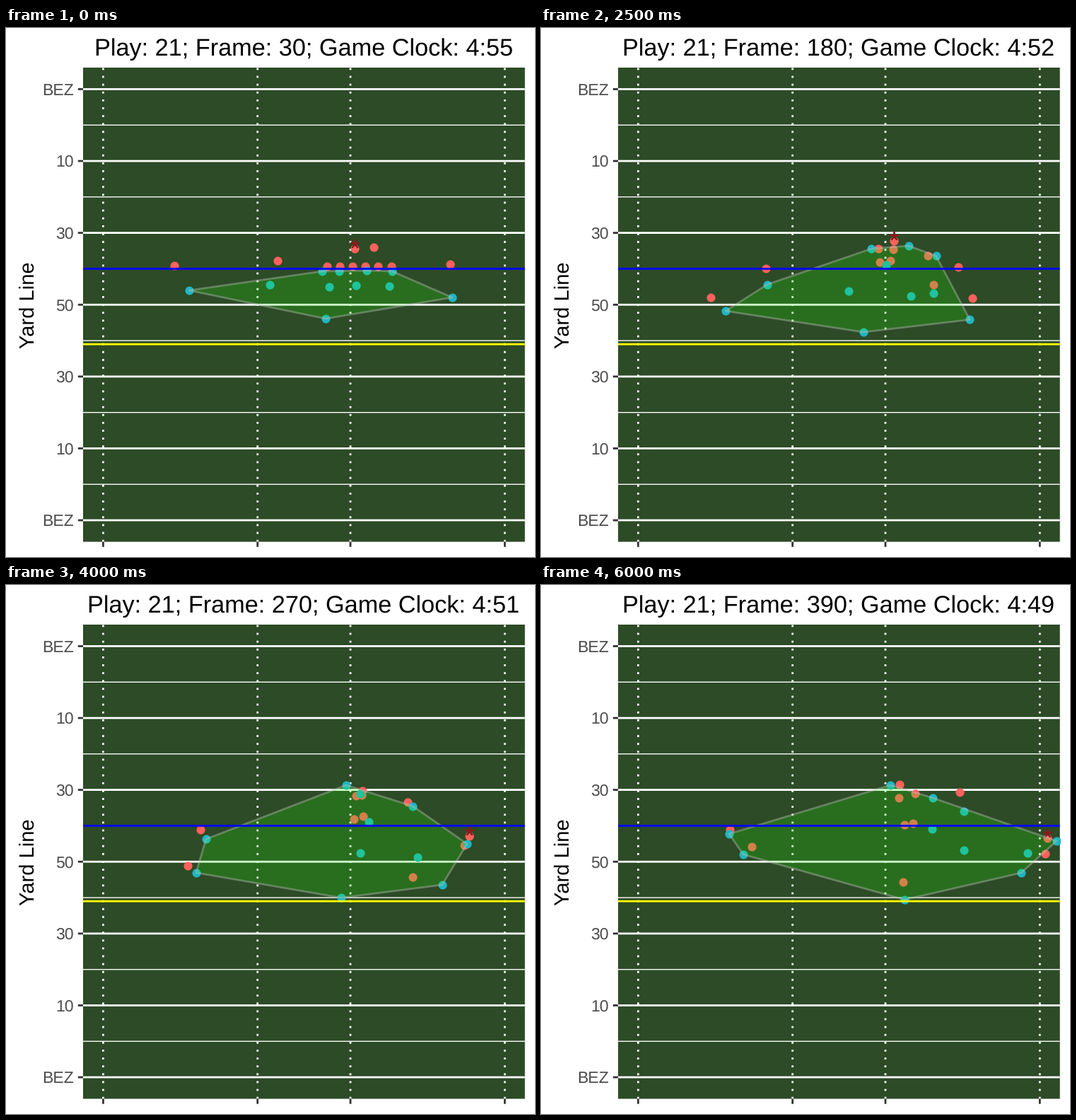
A matplotlib script that plays this animation: 748x748 px, repeating every 6.5 s.

```python
import numpy as np
import matplotlib.pyplot as plt
from matplotlib.animation import FuncAnimation
from matplotlib.patches import Polygon

SIZE, DPI = 748, 100
PT = 72 / DPI                       # points per pixel
LEFT, RIGHT, TOP, BOTTOM = 109, 733.7, 56, 726.5
MID_X, MID_Y = (LEFT + RIGHT) / 2, (TOP + BOTTOM) / 2
YARD_X = (RIGHT - LEFT) / 1.1 / (160 / 3)
YARD_Y = (BOTTOM - TOP) / 1.1 / 120
STEPS, INTERVAL = 13, 500
LINE = 2.78 * PT
THROW, CATCH = 5, 7

FIELD = "#2c4b26"
RED, CYAN, BALL = "#ff615c", "#1fb5c3", "#8b1a1a"

plt.rcParams["font.family"] = "Liberation Sans"
plt.rcParams["text.hinting"] = "none"


def route(*points):
    """Smooth run from the snap through one or two cuts to a stop."""
    times = (1, 7, 12) if len(points) == 3 else (1, 5, 8, 12)
    p = np.array(points, float)
    v = np.gradient(p, times, axis=0)
    v[0] = v[-1] = 0

    def at(t):
        t = max(t, times[0])
        k = min(np.searchsorted(times, t, side="right"), len(times) - 1) - 1
        h = times[k + 1] - times[k]
        u = (t - times[k]) / h
        ease = u * u * (3 - 2 * u)
        return (p[k] + ease * (p[k + 1] - p[k])
                + h * u * (1 - u) * ((1 - u) * v[k] - u * v[k + 1]))

    return at


def line_spot(k):
    """Stance of the k-th blocker on the line of scrimmage."""
    return 453.5 + 18.2 * k, 337


passer = route((493, 312), (503, 294), (507, 282))
carrier = route((520, 310), (635, 352), (716, 358))
offense = [
    route((238, 336), (248, 399), (298, 370)),
    route((384, 329), (283, 345), (267, 346)),
    route((628, 334), (590, 407), (512, 420)),
    route(line_spot(0), (490, 300), (506, 301)),
    route(line_spot(1), (487, 330), (514, 339)),
    route(line_spot(2), (500, 326), (526, 337)),
    route(line_spot(3), (498, 300), (529, 295)),
    route(line_spot(4), (561, 312), (592, 293)),
    route(line_spot(5), (555, 363), (648, 368), (713, 380)),
    passer,
    carrier,
]
defense = [
    # secondary
    route((259, 371), (265, 410), (286, 381)),
    route((373, 363), (291, 361), (266, 352)),
    route((452, 411), (465, 440), (514, 445)),
    route((631, 381), (605, 425), (679, 407)),
    # linebackers
    route((457, 366), (435, 372), (501, 379), (598, 375)),
    route((495, 364), (556, 385), (688, 379)),
    route((542, 365), (555, 375), (652, 366), (729, 362)),
    # rushers
    route((447, 344), (487, 297), (554, 301)),
    route((471, 344), (503, 333), (553, 345)),
    route((510, 343), (520, 308), (481, 283), (494, 283)),
    route((546, 344), (569, 313), (598, 320)),
]


def ball_spot(t):
    """Ball just behind the passer, thrown over to the carrier."""
    flight = np.clip((t - THROW) / (CATCH - THROW), 0, 1)
    return passer(t) * (1 - flight) + carrier(t) * flight - (0, 7)


def hull(points):
    """Convex hull by monotone chain."""
    def chain(pts):
        out = []
        for p in pts:
            while len(out) > 1:
                a, b = out[-2:]
                if (b[0] - a[0]) * (p[1] - a[1]) > (b[1] - a[1]) * (p[0] - a[0]):
                    break
                out.pop()
            out.append(p)
        return out[:-1]

    pts = sorted(map(tuple, points))
    return chain(pts) + chain(pts[::-1])


fig = plt.figure(figsize=(SIZE / DPI, SIZE / DPI), dpi=DPI, facecolor="white")
ax = fig.add_axes([LEFT / SIZE, 1 - BOTTOM / SIZE, (RIGHT - LEFT) / SIZE, (BOTTOM - TOP) / SIZE])
ax.set(xlim=(LEFT, RIGHT), ylim=(BOTTOM, TOP), xticks=[], yticks=[], facecolor=FIELD)
ax.patch.set_snap(False)
for side in ax.spines.values():
    side.set_visible(False)


def stroke(xs, ys, color, width=LINE, **kw):
    ax.plot(xs, ys, color=color, lw=width, solid_capstyle="butt", snap=False, **kw)


def across(y, color, width=LINE, **kw):
    stroke((LEFT, RIGHT), (y, y), color, width, **kw)


def label(x, y, text, px, color="black", **kw):
    return ax.text(x, y, text, fontsize=px * PT, color=color, va="baseline", **kw)


# field grid, ticks and labels
for k, name in enumerate(["BEZ", "10", "30", "50", "30", "10", "BEZ"]):
    y = MID_Y + 20 * YARD_Y * (k - 3)
    if k < 6:
        across(y + 10 * YARD_Y, "white", LINE / 2, zorder=1)
    across(y, "white", zorder=1)
    stroke((LEFT - 7.2, LEFT), (y, y), "#333333", clip_on=False)
    label(95.8, y + 8.2, name, 23, "#4d4d4d", ha="right")
for yards in (-80 / 3, -37 / 6, 37 / 6, 80 / 3):
    x = MID_X + yards * YARD_X
    stroke((x, x), (BOTTOM, TOP), "white", ls=(0, (1, 3)), dash_capstyle="butt", zorder=1)
    stroke((x, x), (BOTTOM, BOTTOM + 7.2), "#333333", clip_on=False)
label(40.2, MID_Y, "Yard Line", 29.1, ha="center", rotation=90, rotation_mode="anchor")
title = label(421, 39, "", 34.28, ha="center")

# players, ball, defensive area
dot = dict(s=(12.1 * PT) ** 2, linewidths=0)
red_dots = ax.scatter([], [], color=RED, zorder=3, **dot)
cyan_dots = ax.scatter([], [], color=CYAN, zorder=4, **dot)
ball = ax.scatter([], [], marker=(5, 2, 0), s=(11.5 * PT) ** 2, color=BALL,
                  linewidths=2 * PT, zorder=5)
area = Polygon([(0, 0)] * 3, facecolor=(0.12, 1, 0.02, 0.2), edgecolor=(0.75, 0.75, 0.75, 0.4),
               lw=LINE, joinstyle="round", zorder=6)
ax.add_patch(area)

# scrimmage and first-down lines
across(MID_Y - 10 * YARD_Y, "#0000ff", zorder=7)
across(MID_Y + 11 * YARD_Y, "#ffff00", zorder=7)


def draw(i):
    guards = [run(i) for run in defense]
    red_dots.set_offsets([run(i) for run in offense])
    cyan_dots.set_offsets(guards)
    ball.set_offsets([ball_spot(i)])
    area.set_xy(hull(guards))
    seconds = 55 - (i + 1) // 2
    title.set_text(f"Play: 21; Frame: {30 * (i + 1)}; Game Clock: 4:{seconds}")
    return red_dots, cyan_dots, ball, area, title


anim = FuncAnimation(fig, draw, frames=STEPS, interval=INTERVAL, repeat=True, repeat_delay=0)
plt.show()
```
